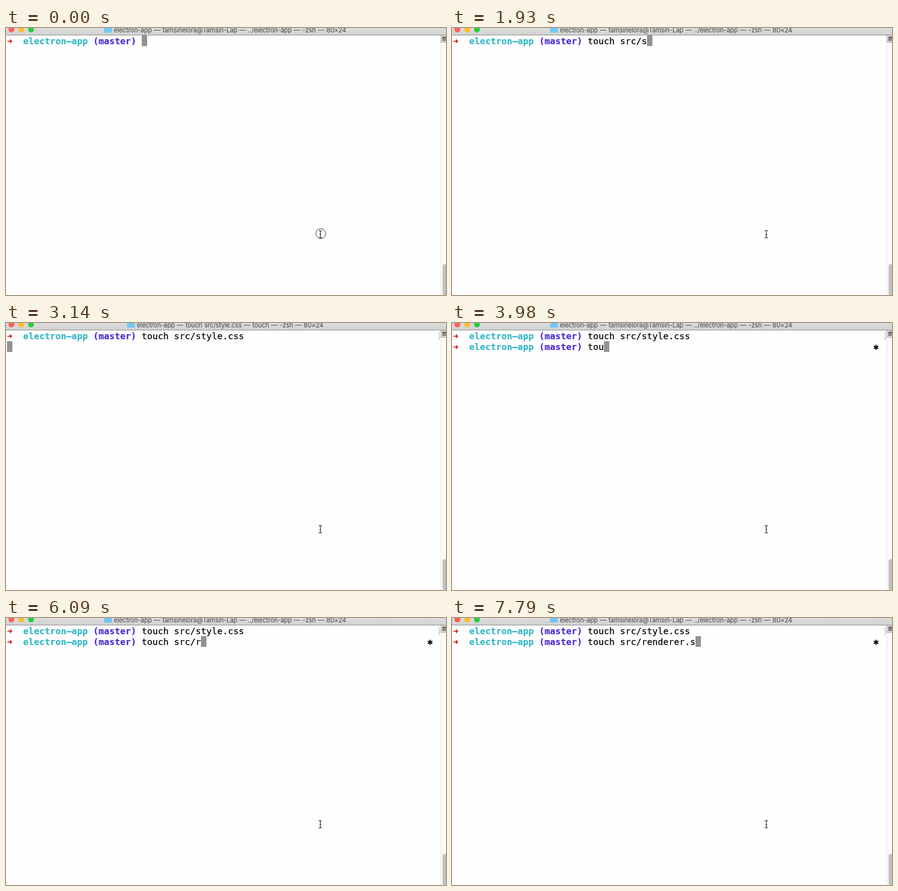
An HTML page with a canvas for the animation above (8 s loop, 898 by 545 pixels).

```html
<!DOCTYPE html>
<html lang="en">
<head>
<meta charset="utf-8">
<title>Terminal</title>
<style>
html, body { margin: 0; width: 100%; height: 100%; overflow: hidden; background: #fefefe; }
canvas { display: block; }
</style>
</head>
<body>
<canvas id="stage" width="898" height="545"></canvas>
<script>
const ctx = document.getElementById('stage').getContext('2d');
const LOOP = 8000, CELL = 11, ROW = 22, PROMPT_END = 25;
const ENTER = 3140, PROMPT_BACK = 3200, TITLE_BACK = 3260;

// Bursts of evenly spaced typing: text, time of first key, time of last key
const lines = [
  [['touch', 60, 320], [' ', 680], ['sr', 920, 980], ['c', 1310], ['/', 1660],
   ['style.cs', 1930, 2690], ['s', 2810]],
  [['touch', 3800, 4150], [' ', 4390], ['sr', 5280, 5400], ['c', 5580], ['/', 5790],
   ['r', 6090], ['en', 6260, 6440], ['dere', 6680, 6960], ['r.', 7200, 7440], ['s', 7790]]
];
const idleTitle = 'electron-app — tamsinelora@Tamsin-Lap — ../electron-app — -zsh — 80×24';
const busyTitle = 'electron-app — touch src/style.css — touch — -zsh — 80×24';

const colX = col => 2 + col * CELL;
const rowY = row => 15 + row * ROW;

function typedText(bursts, t) {
  return bursts.map(([text, first, last = first]) => {
    if (t < first) return '';
    const gap = (last - first) / (text.length - 1);
    return gap ? text.slice(0, 1 + Math.floor((t - first) / gap)) : text;
  }).join('');
}

function rect(color, x, y, w, h, radius = 0) {
  ctx.fillStyle = color;
  ctx.beginPath();
  ctx.roundRect(x, y, w, h, radius);
  ctx.fill();
}

function circle(x, y, r) {
  ctx.beginPath();
  ctx.arc(x, y, r, 0, Math.PI * 2);
}

function stroke(color, width, path) {
  ctx.strokeStyle = color;
  ctx.lineWidth = width;
  ctx.stroke(new Path2D(path));
}

function cells(text, col, row, color, weight = '') {
  ctx.font = `${weight} 18px "DejaVu Sans Mono", monospace`;
  ctx.fillStyle = ctx.strokeStyle = color;
  ctx.lineWidth = 0.25;
  [...text].forEach((ch, i) => {
    const x = colX(col + i), y = rowY(row) + 18;
    ctx.fillText(ch, x, y);
    ctx.strokeText(ch, x, y);
  });
}

function drawTitleBar(title) {
  const shade = ctx.createLinearGradient(0, 0, 0, 14);
  shade.addColorStop(0, '#dcdcdc');
  shade.addColorStop(1, '#d2d2d2');
  rect(shade, 0, 0, 898, 14);
  rect('#848484', 0, 14, 898, 1);
  ['#ff5f57', '#ffbd2e', '#28ca41'].forEach((color, i) => {
    ctx.fillStyle = color;
    circle(11 + 20 * i, 3, 6);
    ctx.fill();
  });

  ctx.save();
  ctx.font = '13px Inter, sans-serif';
  ctx.letterSpacing = '-0.15px';
  ctx.wordSpacing = '1px';
  const left = Math.round(457.5 - ctx.measureText(title).width / 2);
  ctx.fillStyle = '#424242';
  ctx.fillText(title, left, 8.5);
  ctx.restore();
  rect('#72c7f5', left - 20, -4, 16, 13.5, 1);
}

function drawScrollbar() {
  rect('#e3e3e3', 887, 15, 1, 530);
  rect('#fafafa', 888, 15, 10, 530);
  rect('#a8a8a8', 887, 15, 11, 15);
  rect('#d6d6d6', 888, 15, 10, 14);
  rect('#404040', 891, 18, 7, 8);
  for (let y = 20; y < 25; y += 2) rect('#d6d6d6', 892, y, 6, 1);
  rect('#c1c1c1', 891, 482, 11, 63, 4);
}

function drawPrompt(row) {
  const y = rowY(row) + 12;
  stroke('#cf2b1e', 2, `M3 ${y}h8m-3 -3.5l3.5 3.5l-3.5 3.5`);
  cells('electron–app', 3, row, '#33b8c5', 'bold');
  cells('(master)', 16, row, '#4d2bd1', 'bold');
}

function drawAsterisk(x, y) {
  for (let i = 0; i < 3; i++) {
    const a = Math.PI / 2 + i * Math.PI / 3;
    const dx = 5.3 * Math.cos(a), dy = 5.3 * Math.sin(a);
    stroke('#000', 2.3, `M${x - dx} ${y - dy}L${x + dx} ${y + dy}`);
  }
}

function drawPointer(clicked) {
  stroke('#111', 1.2, 'M638 413.5h2l1.5 1.5l1.5 -1.5h2M641.5 415v12' +
    'M638 428.5h2l1.5 -1.5l1.5 1.5h2M640 421.5h3');
  if (!clicked) return;
  ctx.lineWidth = 1;
  circle(642.5, 419.5, 10);
  ctx.stroke();
}

function draw(t) {
  rect('#fefefe', 0, 0, 898, 545);
  const entered = t >= ENTER, prompted = t >= PROMPT_BACK;
  drawTitleBar(entered && t < TITLE_BACK ? busyTitle : idleTitle);
  drawScrollbar();

  const row = entered ? 1 : 0;
  const typed = lines.map(bursts => typedText(bursts, t));
  const cursorCol = entered && !prompted ? 0 : PROMPT_END + typed[row].length;
  rect('#929292', colX(cursorCol), rowY(row), CELL, ROW);

  drawPrompt(0);
  // Bracket marks around the finished command; the left one is mostly off stage
  if (entered) stroke('#a0a0a0', 1, 'M0 20.5h1m-1 13h1M882 20.5h2.5v13h-2.5');
  if (prompted) {
    drawPrompt(1);
    drawAsterisk(865.5, 49.7);
  }
  typed.forEach((text, i) => cells(text, PROMPT_END, i, '#000'));
  drawPointer(t < 60);
}

const start = performance.now();
function tick() {
  draw((performance.now() - start) % LOOP);
  requestAnimationFrame(tick);
}
tick();
</script>
</body>
</html>
```
